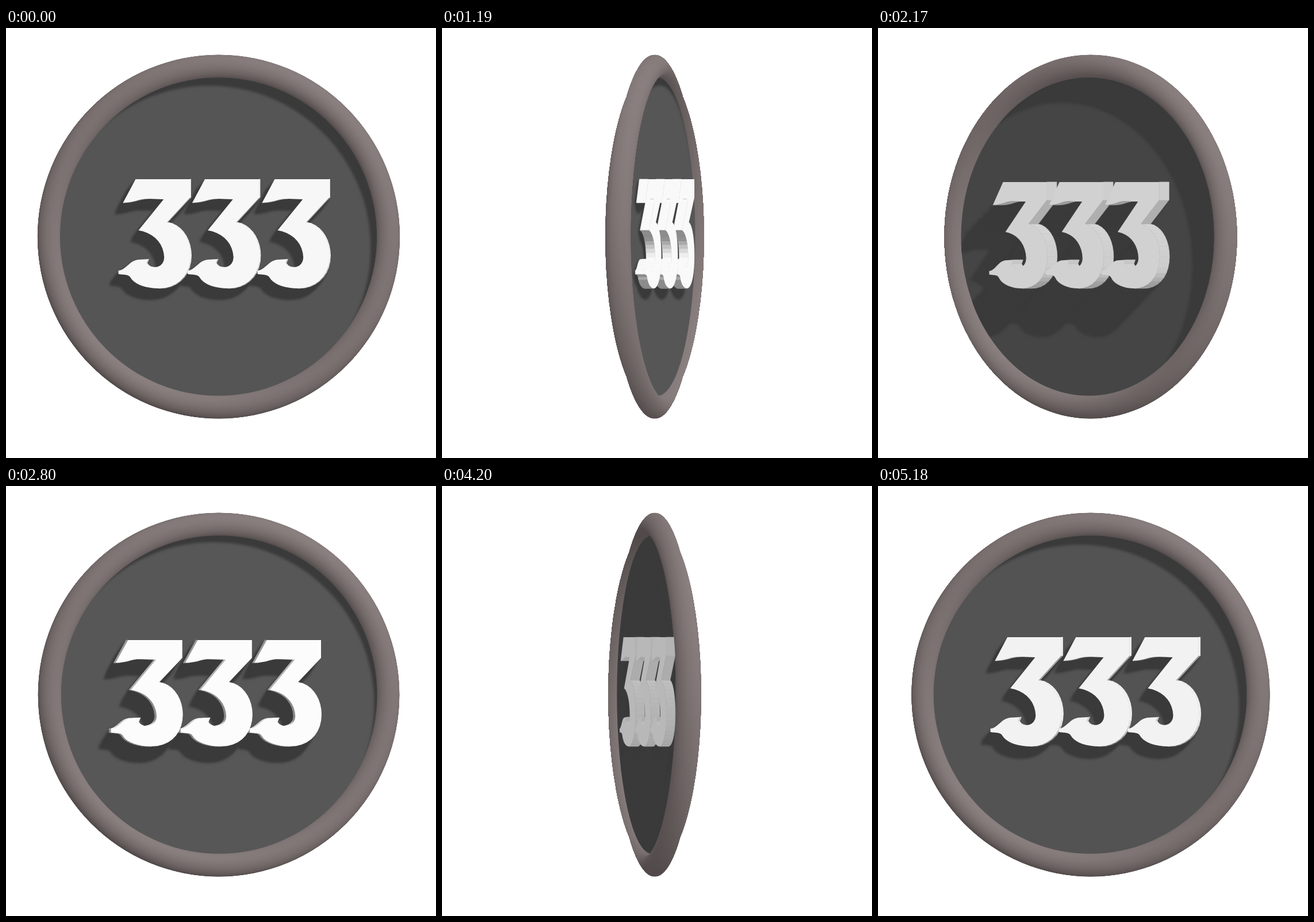
An HTML page with a canvas that plays this animation: 748x748 px, repeating every 5250 ms.

```html
<!DOCTYPE html>
<html lang="en">
<head>
<meta charset="utf-8">
<title>Turning medallion</title>
<style>
html, body { margin: 0; width: 100%; height: 100%; overflow: hidden; background: #fff; }
canvas { display: block; }
</style>
</head>
<body>
<canvas id="stage" width="748" height="748"></canvas>
<script>
const ctx = document.getElementById('stage').getContext('2d');
const SIZE = 748, CX = 370, CY = 363;
const STEP = 70, STEPS = 75, START = -5.3;
const RING = 296.5, TUBE = 20, LOW = 17, HIGH = 29, FLOOR = 5, BASE = 7.5;
const LIGHT = { x: .7, y: .95, z: .95 };
const LIGHT_LEN = Math.hypot(LIGHT.x, LIGHT.y, LIGHT.z);
const SIDES = [
  { turn: 0, top: 23.5, rights: [-48, 73, 195], squash: 1 },
  { turn: Math.PI, top: 36, rights: [-68, 54, 175], squash: .974 }
];

// The numeral: two numbers are a line, six a cubic curve.
const OUTLINE = [
  [224, 263], [319, 263], [319, 295], [279, 338],
  [304, 342, 320, 368, 320, 396], [320, 430, 298, 453, 265, 453],
  [240, 453, 221, 445, 215, 434], [211, 428, 205, 430, 194, 428], [194, 422],
  [207, 421, 213, 405, 228, 403], [246, 402], [243, 409],
  [248, 421, 274, 419, 274, 399], [273, 374, 255, 356, 229, 352],
  [273, 298], [246, 297], [230, 297, 224, 303, 202, 304]
];

const clamp = (v, lo = 0, hi = 1) => Math.min(hi, Math.max(lo, v));
const mix = (a, b, t) => a + (b - a) * t;
const gray = v => { v = Math.round(v); return `rgb(${v},${v},${v})`; };
const metal = t => `rgb(${[[82, 142], [74, 131], [74, 131]].map(([a, b]) => Math.round(mix(a, b, t)))})`;

function trace(parts) {
  const out = [];
  let last;
  for (const p of parts) {
    if (p.length === 2) out.push(last = p);
    else {
      const [x0, y0] = last, [x1, y1, x2, y2, x3, y3] = p;
      for (let i = 1; i <= 9; i++) {
        const t = i / 9, k = 1 - t;
        const at = (a, b, c, d) => k * k * k * a + 3 * k * k * t * b + 3 * k * t * t * c + t * t * t * d;
        out.push([at(x0, x1, x2, x3), at(y0, y1, y2, y3)]);
      }
      last = [x3, y3];
    }
  }
  return out;
}

const glyph = trace(OUTLINE);
for (const side of SIDES) {
  side.glyphs = side.rights.map(r =>
    glyph.map(([x, y]) => [x - 319 + r, 453 + (y - 453) * side.squash - CY]));
}

// How one side is turned, and the light as seen from it.
function pose(side, angle) {
  const c = Math.cos(angle + side.turn), s = Math.sin(angle + side.turn);
  const ln = LIGHT.x * s + LIGHT.z * c;
  return {
    ...side, c, s, ln, lu: LIGHT.x * c - LIGHT.z * s,
    lit: clamp(ln / LIGHT_LEN * 1.6)
  };
}

function place(p, z) {
  ctx.setTransform(Math.max(p.c, .002), 0, 0, 1, CX + z * p.s, CY);
}
const reset = () => ctx.setTransform(1, 0, 0, 1, 0, 0);

function slice(phi) {
  const h = Math.sin(phi);
  return { rho: RING + TUBE * Math.cos(phi), z: h * (h < 0 ? LOW : HIGH) };
}

function ringPaint(p, phi, rho) {
  const len = Math.hypot(p.lu, LIGHT.y);
  const dx = p.lu / len * rho, dy = -LIGHT.y / len * rho;
  const g = ctx.createLinearGradient(-dx, -dy, dx, dy);
  for (let i = 0; i <= 4; i++) {
    const dot = (Math.sin(phi) * p.ln + Math.cos(phi) * len * (i / 2 - 1)) / LIGHT_LEN;
    g.addColorStop(i / 4, metal(clamp(.32 + .62 * dot)));
  }
  return g;
}

function circle(p, rho, z) {
  place(p, z);
  ctx.beginPath();
  ctx.arc(0, 0, rho, 0, 2 * Math.PI);
}

function polygon(points) {
  ctx.beginPath();
  points.forEach(([x, y], i) => i ? ctx.lineTo(x, y) : ctx.moveTo(x, y));
  ctx.closePath();
}

// A tall outer edge joined with a shorter, wider flank.
function silhouette(p) {
  const path = new Path2D(), s = Math.abs(p.s), edge = RING + TUBE;
  const add = (w, h) => {
    path.moveTo(CX + w, CY);
    path.ellipse(CX, CY, w, h, 0, 0, 2 * Math.PI);
  };
  add(Math.hypot(edge * p.c, 16 * s), edge);
  add(RING * p.c + 16 * s, RING);
  return path;
}

function drawFloor(p) {
  const ln = Math.max(p.ln, .25), kx = -p.lu / ln, ky = LIGHT.y / ln;
  circle(p, RING, FLOOR);
  ctx.fillStyle = gray(58 + 29 * p.lit);
  ctx.fill();

  ctx.fillStyle = gray(58);
  ctx.filter = 'blur(2px)';
  ctx.beginPath();
  ctx.rect(-500, -500, 1000, 1000);
  const drop = 18;
  ctx.moveTo(282 + kx * drop, ky * drop);
  ctx.arc(kx * drop, ky * drop, 282, 0, 2 * Math.PI);
  ctx.fill('evenodd');

  const rise = p.top - FLOOR;
  for (let i = 1; i <= 8; i++) {
    const h = rise * i / 8;
    ctx.beginPath();
    for (const g of p.glyphs) {
      g.forEach(([x, y], j) => ctx[j ? 'lineTo' : 'moveTo'](x + kx * h, y + ky * h));
      ctx.closePath();
    }
    ctx.fill();
  }
  ctx.filter = 'none';
}

function drawBody(p) {
  ctx.save();
  ctx.clip(silhouette(p));
  for (let i = 0; i <= 44; i++) {
    const phi = (i / 44 - .5) * Math.PI, { rho, z } = slice(phi);
    circle(p, rho, z);
    ctx.fillStyle = ringPaint(p, phi, rho);
    ctx.fill();
  }
  // Each inner step narrows the opening down to the floor.
  const end = Math.PI - Math.asin(FLOOR / HIGH);
  for (let i = 1; i <= 20; i++) {
    const phi = mix(Math.PI / 2, end, i / 20), { rho, z } = slice(phi);
    circle(p, rho, z);
    ctx.clip();
    ctx.fillStyle = ringPaint(p, phi, rho);
    ctx.fill();
  }
  drawFloor(p);
  ctx.restore();
  reset();
}

// Walls in shade keep a flat tone; lit ones follow the light.
function wallShade(p, nx, up) {
  const dot = (nx * p.lu + up * LIGHT.y) / LIGHT_LEN;
  return mix(180 + 12 * up, clamp(160 + 190 * dot, 140, 252), p.lit);
}

function drawNumerals(p) {
  const at = (x, y, z) => [CX + x * p.c + z * p.s, CY + y];
  const walls = [];
  for (const g of p.glyphs) {
    g.forEach(([x0, y0], i) => {
      const [x1, y1] = g[(i + 1) % g.length];
      const dx = x1 - x0, dy = y1 - y0, len = Math.hypot(dx, dy);
      if (len < .01 || dy * p.s >= 0) return;
      walls.push({
        depth: -(x0 + x1) * p.s,
        shade: wallShade(p, dy / len, dx / len),
        quad: [at(x0, y0, BASE), at(x1, y1, BASE), at(x1, y1, p.top), at(x0, y0, p.top)]
      });
    });
  }
  walls.sort((a, b) => a.depth - b.depth);

  const drawFaces = () => {
    ctx.fillStyle = gray(184 + 68 * p.lit);
    for (const g of p.glyphs) {
      polygon(g.map(([x, y]) => at(x, y, p.top)));
      ctx.fill();
    }
  };
  if (p.c < 0) drawFaces();
  ctx.lineWidth = .7;
  for (const w of walls) {
    polygon(w.quad);
    ctx.fillStyle = ctx.strokeStyle = gray(w.shade);
    ctx.fill();
    ctx.stroke();
  }
  if (p.c >= 0) drawFaces();
}

// Keeps the numerals behind the nearer part of the rim.
function clipNearRim(p) {
  const x = CX + 26 * p.s, far = p.s > 0 ? SIZE : 0;
  ctx.beginPath();
  ctx.moveTo(far, CY - 286);
  ctx.lineTo(x, CY - 286);
  ctx.ellipse(x, CY, 286 * p.c, 286, 0, -Math.PI / 2, Math.PI / 2, p.s > 0);
  ctx.lineTo(far, CY + 286);
  ctx.closePath();
  ctx.clip();
}

function draw(angle) {
  reset();
  ctx.fillStyle = '#fff';
  ctx.fillRect(0, 0, SIZE, SIZE);
  const poses = SIDES.map(side => pose(side, angle)).sort((a, b) => a.c - b.c);
  const [back, front] = poses;
  if (front.c < .2) drawNumerals(back);
  drawBody(front);
  ctx.save();
  clipNearRim(front);
  drawNumerals(front);
  ctx.restore();
}

const began = performance.now();
let shown = -1;
function tick() {
  const step = Math.floor((performance.now() - began) / STEP) % STEPS;
  if (step !== shown) {
    shown = step;
    draw((START + step * 360 / STEPS) * Math.PI / 180);
  }
  requestAnimationFrame(tick);
}
tick();
</script>
</body>
</html>
```
